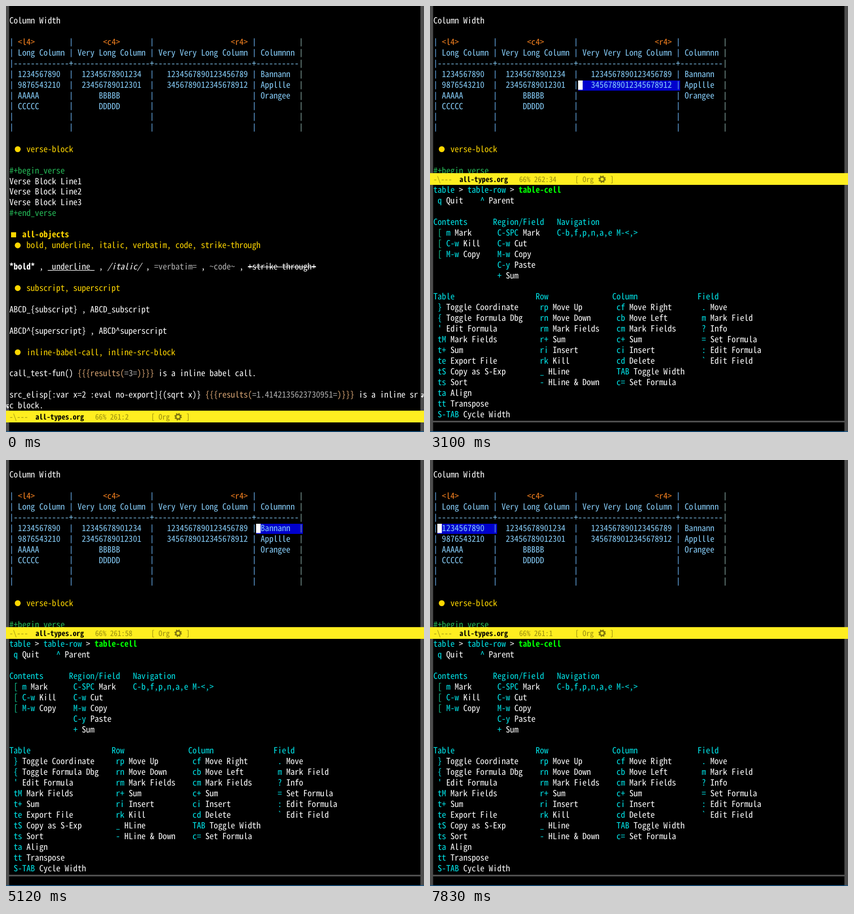
These frames come from a looping animation (742x755 px, 8000 ms). An HTML page:

```html
<!DOCTYPE html>
<html lang="en">
<head>
<meta charset="utf-8">
<title>Org table menu</title>
<style>
  html, body { margin: 0; width: 100%; height: 100%; overflow: hidden; background: #000; }
  svg { display: block; width: 742px; height: 755px; }
  text {
    font-family: "Noto Sans Mono CJK JP", "Noto Sans Mono", monospace;
    white-space: pre; font-kerning: none; font-variant-ligatures: none;
    text-rendering: geometricPrecision;
  }
  .bold { font-weight: bold; }
  .italic { font-style: italic; }
</style>
</head>
<body>
<svg id="stage" viewBox="0 0 742 755"></svg>
<script>
const CELL = 7.56, ROW = 18.94, LEFT = 6, BAR_CELL = 6.62, PIPE_CELL = 6.3, LOOP = 8000;
const WHITE = '#fff', GRAY = '#4d4d4d', GOLD = '#ffd700', SKY = '#87cefa', PIPE = '#64a6e2',
      EDGE = '#7f9f9a', ORANGE = '#f5811f', GREEN = '#26bb59', VERBATIM = '#b0b0b0',
      TAN = '#d6a473', CYAN = '#00e6ea', YELLOW = '#ffee20', OLIVE = '#958a10';

const stage = document.getElementById('stage');

// Font size that gives the wanted advance per character
const pen = document.createElement('canvas').getContext('2d');
pen.font = '100px "Noto Sans Mono CJK JP", "Noto Sans Mono", monospace';
const advance = pen.measureText('0').width / 100;

function add(parent, tag, attrs = {}) {
  const el = document.createElementNS('http://www.w3.org/2000/svg', tag);
  for (const key in attrs) el.setAttribute(key, attrs[key]);
  return parent.appendChild(el);
}
const rect = (parent, x, y, width, height, fill) =>
  add(parent, 'rect', { x, y, width, height, fill });

function write(parent, x, y, text, fill, cls = '', cell = CELL) {
  const el = add(parent, 'text', { x, y, fill, class: cls, 'font-size': cell / advance });
  el.textContent = text;
  return el;
}
const colX = col => LEFT + col * CELL;
const edgeX = col => Math.round(colX(col) - 0.2);

// Layers
rect(stage, 0, 0, 742, 755, '#000');
rect(stage, 0, 0, 5.5, 755, GRAY);
rect(stage, 735.6, 0, 6.4, 755, GRAY);
const mark = add(stage, 'g');
const doc = add(stage, 'g');
const menu = add(stage, 'g');
const bar = add(stage, 'g');
rect(stage, 0, 753.7, 742, 1.3, '#1a5f96');

// Selected cell and cursor
const field = rect(mark, 0, 0, 0, 18, '#0000cd');
const cursor = rect(mark, 0, 0, 8, 16.5, WHITE);

// Document
const put = (row, col, text, fill = WHITE, cls) =>
  write(doc, colX(col), row * ROW + 12.5, text, fill, cls);

function heading(row, text) {
  add(doc, 'circle', { cx: 20.8, cy: row * ROW + 7.5, r: 5.2, fill: GOLD });
  put(row, 4, text, GOLD);
}

function pipe(row, col) {
  const x = colX(col) + (CELL - PIPE_CELL) / 2;
  write(doc, x, row * ROW + 11, '|', col === 68 ? EDGE : PIPE, 'bold', PIPE_CELL);
}

put(1, 0, 'Column Width');

const BARS = [0, 14, 33, 57, 68];
for (const row of [3, 4, 6, 7, 8, 9, 10, 11])
  for (const col of BARS) pipe(row, col);
pipe(5, 0);
pipe(5, 68);
put(5, 1, [13, 18, 23, 10].map(n => '-'.repeat(n)).join('+'), SKY);

put(3, 2, '<l4>', ORANGE);
put(3, 22, '<c4>', ORANGE);
put(3, 52, '<r4>', ORANGE);
[
  [4, 2, 'Long Column'], [4, 16, 'Very Long Column'],
  [4, 35, 'Very Very Long Column'], [4, 59, 'Columnnn'],
  [6, 2, '1234567890'], [6, 17, '12345678901234'],
  [6, 37, '1234567890123456789'], [6, 59, 'Bannann'],
  [7, 2, '9876543210'], [7, 17, '23456789012301'],
  [7, 37, '3456789012345678912'], [7, 59, 'Appllle'],
  [8, 2, 'AAAAA'], [8, 21, 'BBBBB'], [8, 59, 'Orangee'],
  [9, 2, 'CCCCC'], [9, 21, 'DDDDD']
].forEach(([row, col, text]) => put(row, col, text, SKY));

heading(13, 'verse-block');
put(15, 0, '#+begin_verse', GREEN);
for (let i = 1; i <= 3; i++) put(15 + i, 0, 'Verse Block Line' + i);
put(19, 0, '#+end_verse', GREEN);

rect(doc, 9, 401, 9, 9, GOLD);
put(21, 3, 'all-objects', GOLD, 'bold');
heading(22, 'bold, underline, italic, verbatim, code, strike-through');

put(24, 0, '*bold*', WHITE, 'bold');
put(24, 9, '_underline_');
rect(doc, colX(9), 468, 11 * CELL, 1, WHITE);
put(24, 23, '/italic/', WHITE, 'italic');
put(24, 34, '=verbatim=', VERBATIM);
put(24, 47, '~code~', VERBATIM);
put(24, 56, '+strike through+');
rect(doc, colX(56), 462, 16 * CELL, 1, WHITE);
for (const col of [7, 21, 32, 45, 54]) put(24, col, ',');

heading(26, 'subscript, superscript');
put(28, 0, 'ABCD_{subscript} , ABCD_subscript');
put(30, 0, 'ABCD^{superscript} , ABCD^superscript');

heading(32, 'inline-babel-call, inline-src-block');

function callLine(row, call, value, rest) {
  let col = 0;
  for (const [text, fill] of [
    [call + ' ', WHITE], ['{{{results(', TAN], [`=${value}=`, VERBATIM], [')}}}', TAN], [rest, WHITE]
  ]) {
    put(row, col, text, fill);
    col += text.length;
  }
}
callLine(34, 'call_test-fun()', '3', ' is a inline babel call.');
callLine(36, 'src_elisp[:var x=2 :eval no-export]{(sqrt x)}', '1.4142135623730951', ' is a inline sr');
put(37, 0, 'c block.');

// Line-wrap hooks in the fringes
const hook = d => add(doc, 'path', { d, fill: 'none', stroke: WHITE, 'stroke-width': 1.2 });
hook('M737 687.5h3.5v4.5h-3M739.5 690l-2 2 2 2');
hook('M5 706.5h-3.5v4.5h3M2.5 709l2 2-2 2');

// Menu window
rect(menu, 0, 316, 742, 422, GRAY);
rect(menu, 5.5, 316, 730.1, 419, '#000');
const item = (row, col, text, fill = CYAN, cls) =>
  write(menu, colX(col), 331 + row * ROW, text, fill, cls);

function command(row, col, entry) {
  const cut = entry.indexOf(' ');
  item(row, col, entry.slice(0, cut));
  item(row, col + cut + 1, entry.slice(cut + 1), WHITE);
}
function section(row, col, title, entries) {
  item(row, col, title);
  entries.forEach((entry, i) => command(row + 1 + i, col + 1, entry));
}

item(0, 0, 'table');
item(0, 6, '>', WHITE);
item(0, 8, 'table-row');
item(0, 18, '>', WHITE);
item(0, 20, 'table-cell', '#00ff00', 'bold');
command(1, 1, 'q Quit');
command(1, 11, '^ Parent');

item(3, 0, 'Contents');
['m Mark', 'C-w Kill', 'M-w Copy'].forEach((entry, i) => {
  item(4 + i, 1, '[', '#14d09a');
  command(4 + i, 3, entry);
});
section(3, 14, 'Region/Field', ['C-SPC Mark', 'C-w Cut', 'M-w Copy', 'C-y Paste', '+ Sum']);
item(3, 29, 'Navigation');
item(4, 29, 'C-b,f,p,n,a,e M-<,>');

section(10, 0, 'Table', [
  '} Toggle Coordinate', '{ Toggle Formula Dbg', "' Edit Formula", 'tM Mark Fields', 't+ Sum',
  'te Export File', 'tS Copy as S-Exp', 'ts Sort', 'ta Align', 'tt Transpose', 'S-TAB Cycle Width'
]);
section(10, 24, 'Row', [
  'rp Move Up', 'rn Move Down', 'rm Mark Fields', 'r+ Sum', 'ri Insert', 'rk Kill',
  '_ HLine', '- HLine & Down'
]);
section(10, 42, 'Column', [
  'cf Move Right', 'cb Move Left', 'cm Mark Fields', 'c+ Sum', 'ci Insert', 'cd Delete',
  'TAB Toggle Width', 'c= Set Formula'
]);
section(10, 62, 'Field', [
  '. Move', 'm Mark Field', '? Info', '= Set Formula', ': Edit Formula', '` Edit Field'
]);

// Mode line, drawn at its lower place
rect(bar, 0, 717.2, 742, 20.8, YELLOW);
const label = (col, text, fill = OLIVE, cls) =>
  write(bar, LEFT + col * BAR_CELL, 732.5, text, fill, cls, BAR_CELL);
label(0, '-\\---');
label(7, 'all-types.org', '#000', 'bold');
const place = label(23, '');
label(38, '[ Org');
label(47.4, ']');
const gear = { cx: 305.5, cy: 728, fill: 'none', stroke: '#7d7410' };
add(bar, 'circle', { ...gear, r: 4, 'stroke-width': 2.4 });
add(bar, 'circle', { ...gear, r: 5.6, 'stroke-width': 2, 'stroke-dasharray': '2.3 2.098' });

// [time, table row, table column]; no row means the menu is closed
const STEPS = [
  [0], [500, 6, 0], [2500, 6, 1], [2700, 6, 2], [3100, 7, 2], [3400, 8, 2],
  [3820, 8, 1], [4020, 8, 0], [4520, 7, 0], [4620, 6, 0], [5120, 6, 3],
  [5520, 6, 0], [6120, 6, 3], [6520, 3, 0], [7130, 4, 0], [7330, 6, 0],
  [7430, 7, 0], [7830, 6, 0]
];
let shown = null;

function show([, row, cell]) {
  const open = row !== undefined;
  menu.style.display = mark.style.display = open ? '' : 'none';
  bar.setAttribute('transform', `translate(0 ${open ? -421 : 0})`);
  if (!open) {
    place.textContent = '66% 261:2';
    return;
  }
  const from = BARS[cell] + 1;
  for (const el of [field, cursor]) {
    el.setAttribute('x', edgeX(from));
    el.setAttribute('y', row * 19 - 1);
  }
  field.setAttribute('width', edgeX(BARS[cell + 1] + 1) - edgeX(from));
  place.textContent = `66% ${255 + row}:${from}`;
}

function tick() {
  const t = performance.now() % LOOP;
  const step = STEPS.findLast(s => s[0] <= t);
  if (step !== shown) show(shown = step);
  requestAnimationFrame(tick);
}
tick();
</script>
</body>
</html>
```
